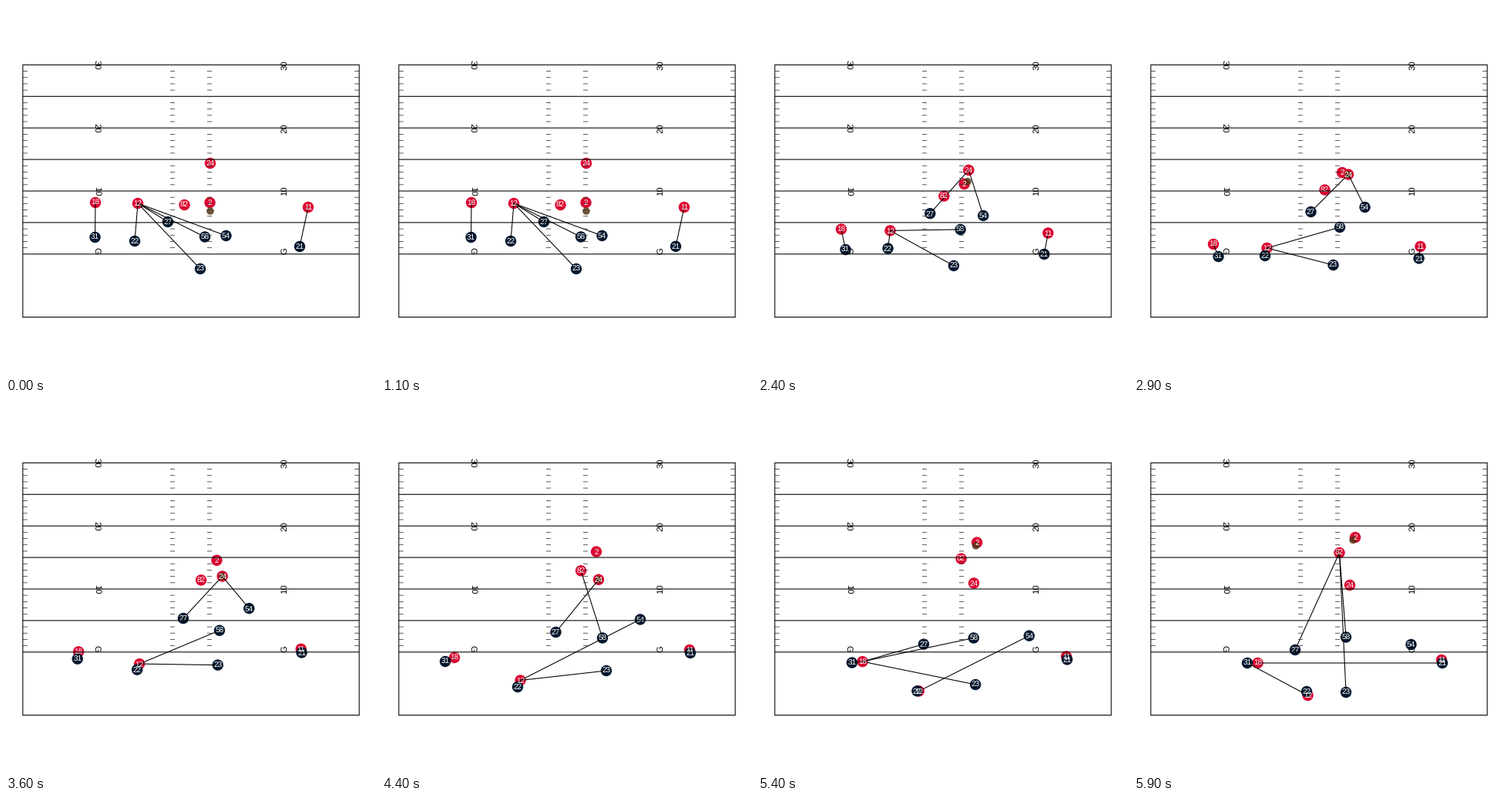
A matplotlib script that plays this animation: 480 by 480 pixels, repeating every 6000 ms.

```python
import numpy as np
import matplotlib.pyplot as plt
from matplotlib.animation import FuncAnimation
from matplotlib.patches import Circle

SIZE, DPI = 480, 96
PT = 72 / DPI
FRAMES, STEP = 60, 100
RED, NAVY, BROWN = "#da0530", "#02182f", "#553519"
YARD = SIZE / 1.1 / (160 / 3)
MID = SIZE / 2
LEFT, RIGHT = SIZE / 22, SIZE - SIZE / 22
RADIUS = 7.2

SNAP, BREAK, LAST = 14, 29, FRAMES - 1

plt.rcParams["font.family"] = "Liberation Sans"
plt.rcParams["text.hinting"] = "none"

# Routes: start, place at the break, (turn,) end.
OFFENCE = {
    18: [(116, 255), (103, 309), (94, 329), (160.5, 336)],
    12: [(171, 256), (172.5, 314), (179.5, 358.5), (225.5, 378)],
    82: [(231.5, 258), (247.5, 238.5), (266.5, 193)],
    2: [(264.5, 255), (270, 216), (287, 173)],
    24: [(265, 204), (278, 218.5), (280, 235)],
    11: [(392, 261), (371.5, 312), (399, 319), (399, 332)],
}
DEFENCE = {
    31: [(115.5, 300), (109.5, 325), (82, 334), (147, 336)],
    22: [(167, 305), (170, 324), (176, 367), (224, 373)],
    27: [(210, 280), (229.5, 267), (225.5, 296), (209, 319)],
    58: [(258, 299.5), (267, 287), (286, 303.5), (275, 302.5)],
    54: [(285.5, 298), (299.5, 261), (335, 279.5), (359.5, 312)],
    23: [(252, 341), (258.5, 336), (291, 346), (275, 374)],
}
CORNER = 21  # shadows receiver 11

# Coverage: from this frame on, these defenders are tied to this player.
COVERAGE = [
    (0, 18, [31]), (0, 12, [22, 27, 58, 54, 23]), (0, 11, [21]),
    (24, 24, [27, 54]),
    (40, 82, [58]), (40, 12, [54]),
    (49, 18, [27, 58, 23]),
    (57, 82, [27, 58, 23]), (57, 18, [21]), (57, 12, [31]), (57, None, [54]),
]

time = np.arange(FRAMES)[:, None]


def ease(start, end):
    u = np.clip((time - start) / (end - start), 0, 1)
    return u * u * (3 - 2 * u)


def run(points):
    """Smooth path that barely drifts before the snap."""
    p = np.array(points, float)
    keys = np.append(0, np.linspace(BREAK, LAST, len(p) - 1) - SNAP)
    clock = np.logaddexp(0, (time - SNAP) / 1.5) * 1.5
    h = np.diff(keys)[:, None]
    v = np.diff(p, axis=0) / h
    inner = (v[:-1] * h[1:] + v[1:] * h[:-1]) / (h[:-1] + h[1:])
    m = np.vstack([np.zeros(2), inner, v[-1:]])
    i = np.clip(np.searchsorted(keys, clock[:, 0], "right") - 1, 0, len(h) - 1)
    w = h[i]
    u = (clock - keys[i][:, None]) / w
    s = u * u * (3 - 2 * u)
    return (p[i] + s * (p[i + 1] - p[i])
            + w * u * (1 - u) * ((1 - u) * m[i] - u * m[i + 1]))


def carry_ball(paths):
    """Snap to 2, handoff to 24, pitch back to 2."""
    angle = 0.075 * (time - SNAP) - 1.1
    hands = paths[2] + 4.5 * np.hstack([np.cos(angle), np.sin(angle)])
    spot = np.array([265, 266])
    ball = spot + ease(12, 17) * (hands - spot)
    away = ease(23, 28) - ease(45, 50)
    return ball + away * (paths[24] - ball)


def coverage(frame):
    pairs = {}
    for start, target, defenders in COVERAGE:
        if frame >= start:
            pairs.update(dict.fromkeys(defenders, target))
    return pairs


fig = plt.figure(figsize=(SIZE / DPI, SIZE / DPI), dpi=DPI, facecolor="white")
ax = fig.add_axes([0, 0, 1, 1])
ax.set_xlim(0, SIZE)
ax.set_ylim(SIZE, 0)
ax.axis("off")


def stroke(x, y, width=1.07, color="black", z=10):
    return ax.plot(x, y, color=color, lw=width * PT, zorder=z, snap=False,
                   solid_capstyle="butt")[0]


def yard_y(yard):
    return MID - (yard - 10) * YARD


def draw_field():
    for x in (LEFT, RIGHT):
        stroke([x, x], [yard_y(30) - 0.5, yard_y(-10) + 0.5])
    for yard in [-10, *range(0, 31, 5)]:
        stroke([LEFT, RIGHT], [yard_y(yard)] * 2)
    for yard in range(1, 30):
        if yard % 5:
            for x in (LEFT, 213, 261, RIGHT - 6):
                stroke([x, x + 6], [yard_y(yard)] * 2, 0.8, "#333333")
    for yard in range(0, 31, 10):
        y = yard_y(yard) - (0 if yard else 4.3)
        for x, angle in ((115, -90), (364, 90)):
            ax.text(x, y, str(yard or "G"), rotation=angle, rotation_mode="anchor",
                    ha="center", va="baseline", fontsize=11.4 * PT, zorder=11)


def disc(radius, color, z):
    return ax.add_patch(Circle((0, 0), radius, fc=color, ec="none", zorder=z))


draw_field()
paths = {n: run(points) for n, points in {**OFFENCE, **DEFENCE}.items()}
paths[CORNER] = paths[11] + (1, 4) + (1 - ease(10, 38)) * (-12, 47)
ball_at = carry_ball(paths)

discs, labels = {}, {}
for k, n in enumerate(paths):
    discs[n] = disc(RADIUS, RED if n in OFFENCE else NAVY, 2 + k * 0.1)
    labels[n] = ax.text(0, 0, str(n), color="white", fontsize=10 * PT,
                        ha="center", va="baseline", zorder=6)
ball = disc(4.8, BROWN, 4)
ball.set_alpha(0.85)
links = {n: stroke([], [], z=5) for n in coverage(0)}


def update(frame):
    ball.center = ball_at[frame]
    for n, path in paths.items():
        x, y = path[frame]
        discs[n].center = x, y
        labels[n].set_position((x, y + 3.4))
    for n, target in coverage(frame).items():
        ends = [paths[n][frame], paths[target][frame]] if target else []
        links[n].set_data(*zip(*ends) if ends else ([], []))
    return [ball, *discs.values(), *labels.values(), *links.values()]


anim = FuncAnimation(fig, update, frames=FRAMES, interval=STEP,
                     repeat=True, repeat_delay=0, blit=False)
plt.show()
```
